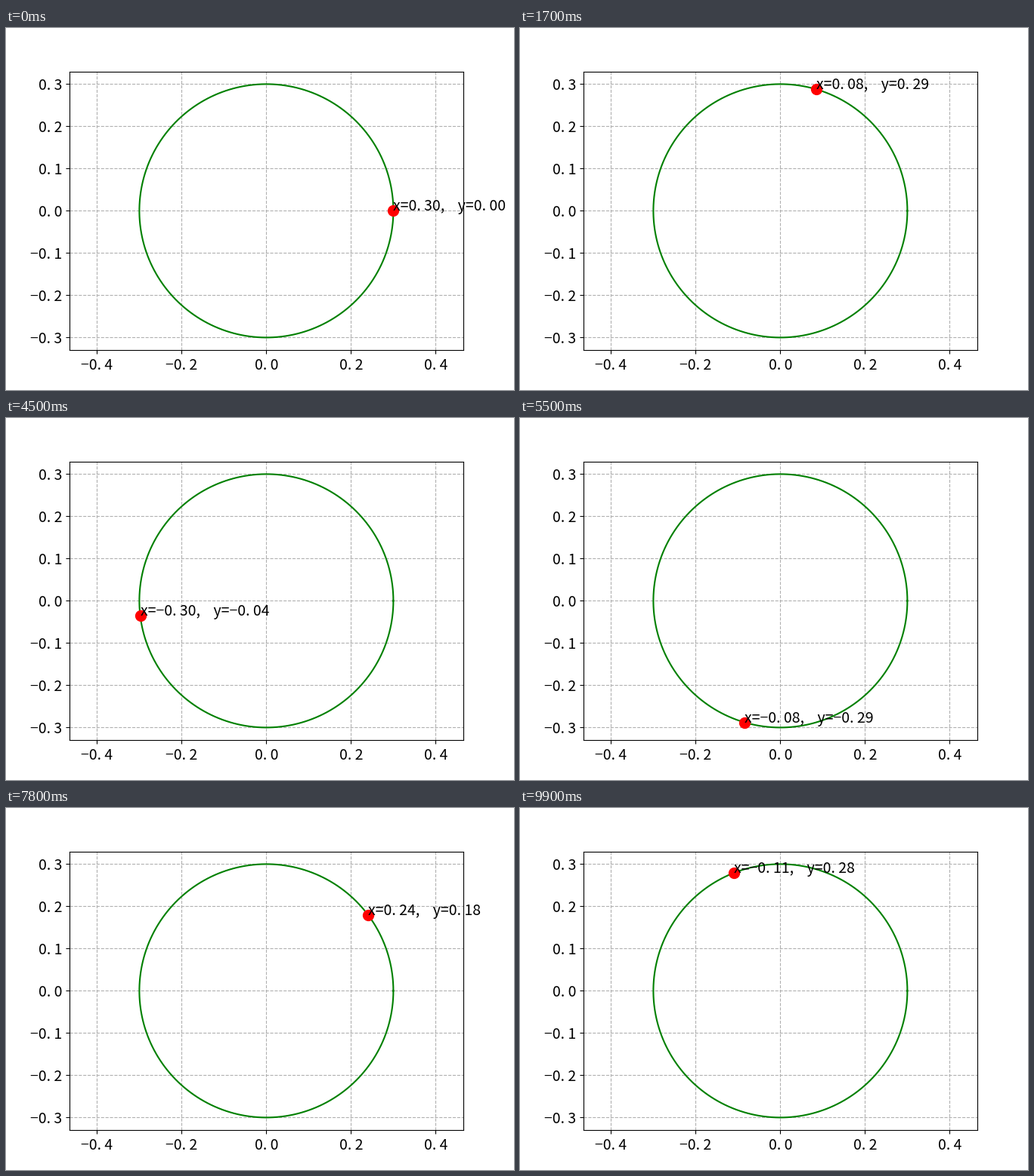
A matplotlib script for the animation above (10000 ms loop, 672 px wide and 480 px high).

```python
import numpy as np
import matplotlib.pyplot as plt
from matplotlib.animation import FuncAnimation

plt.rcParams["font.family"] = "Noto Sans CJK JP"
plt.rcParams["font.size"] = 14

G, R, DT, FRAMES = 9.8, 0.3, 0.01, 100
SUBSTEPS = 10


def slope(state):
    angle, speed = state
    return np.array([speed, -G / R * np.cos(angle)])


def rk4(state, h):
    a = slope(state)
    b = slope(state + h / 2 * a)
    c = slope(state + h / 2 * b)
    d = slope(state + h * c)
    return state + h / 6 * (a + 2 * b + 2 * c + d)


def loop_angles():
    """Bead on a vertical loop, just fast enough to pass the top."""
    state = np.array([0.0, np.sqrt(3 * G / R)])
    angles = []
    for _ in range(FRAMES):
        angles.append(state[0])
        for _ in range(SUBSTEPS):
            state = rk4(state, DT / SUBSTEPS)
    return np.array(angles)


def spaced(text):
    """Wide decimal points and true minus signs."""
    return text.replace(".", ". ").replace("-", "\u2212")


def tick_label(value, _):
    return spaced(f"{round(value, 1) + 0.0:.1f}")


angles = loop_angles()
xs, ys = R * np.cos(angles), R * np.sin(angles)

fig, ax = plt.subplots(figsize=(6.72, 4.8), dpi=100)
fig.subplots_adjust(left=0.125, right=0.9, bottom=0.11, top=0.88)
ax.set_xlim(-0.465, 0.465)
ax.set_ylim(-0.33, 0.33)
ax.set_xticks(np.arange(-2, 3) * 0.2)
ax.set_yticks(np.arange(-3, 4) * 0.1)
ax.xaxis.set_major_formatter(tick_label)
ax.yaxis.set_major_formatter(tick_label)
ax.grid(linestyle="--")

turn = np.linspace(0, 2 * np.pi, 200)
ax.plot(R * np.cos(turn), R * np.sin(turn), "g")
bead, = ax.plot([R], [0], "ro", markersize=10)
label = ax.text(R, 0, "")


def update(i):
    x, y = xs[i], ys[i]
    bead.set_data([x], [y])
    label.set_position((x, y))
    label.set_text(spaced(f"x={x:.2f},    y={y:.2f}"))
    return bead, label


anim = FuncAnimation(fig, update, frames=FRAMES, interval=100,
                     repeat=True, repeat_delay=0)
plt.show()
```
